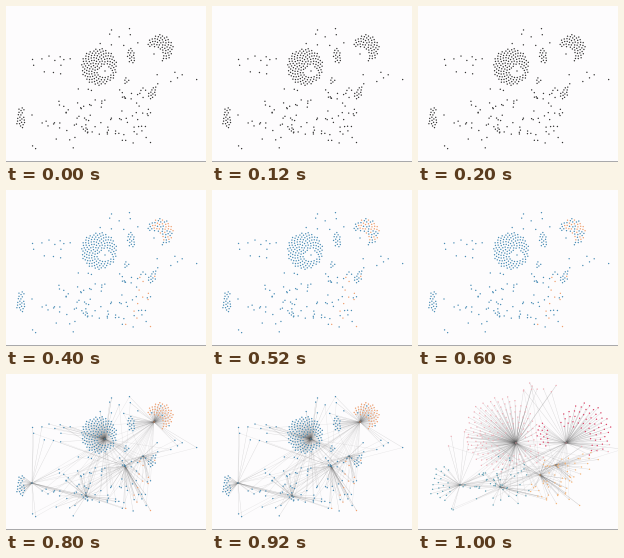
A matplotlib script for the animation above (1200 ms loop, 200 by 156 pixels).

```python
import numpy as np
import matplotlib.pyplot as plt
from matplotlib.animation import FuncAnimation
from matplotlib.collections import LineCollection
from matplotlib.colors import to_rgba

W, H, DPI = 200, 156, 100
BLACK, BLUE, ORANGE = "#333333", "#4a8db5", "#f0a070"
PINK, CRIMSON, TEAL, AMBER = "#efb0b8", "#dc4468", "#5f9fb4", "#f6b67a"
GOLDEN_ANGLE = np.pi * (3 - np.sqrt(5))
rng = np.random.default_rng(7)


def packed(center, rx, ry, tilt=0, hole=None, step=1.48):
    """Evenly packed dots in a tilted ellipse, minus an optional disc (x, y, r)."""
    k = np.arange(300) + 0.5
    r, a, t = step * np.sqrt(k), k * GOLDEN_ANGLE, np.radians(tilt)
    u, v = r * np.cos(a - t) / rx, r * np.sin(a - t) / ry
    p = np.column_stack([r * np.cos(a), r * np.sin(a)])[u**2 + v**2 <= 1] + center
    if hole:
        p = p[np.hypot(*(p - hole[:2]).T) > hole[2]]
    return p


def sprinkled(n, x0, x1, y0, y1):
    return rng.uniform((x0, y0), (x1, y1), (n, 2))


def spread(p, center, scale):
    return center + (p - p.mean(axis=0)) * scale


def nearest(p, targets):
    return np.argmin(np.hypot(*(p[:, None] - targets).transpose(2, 0, 1)), axis=1)


hubs = np.array([(99, 65), (148, 48), (26, 109), (137, 82), (119, 92), (80, 122)])
hubs_open = np.array([(98, 69), (148, 69), (42, 111), (137, 91), (122, 101), (82, 113)])

# Each cluster: dots, opened centre, opened scale, hub, final colour
clusters = [
    (packed((93, 61), 18, 18.8, hole=(99, 65.5, 6)), (82, 59), 2.05, 0, PINK),
    (packed((154, 42), 13.2, 13.6, hole=(146, 51, 10.5)), (171, 51), 2, 1, CRIMSON),
    (packed((125.3, 50), 4, 8.5, -12), (125, 61), 1.6, 1, CRIMSON),
    (packed((15.5, 112), 5.5, 10.5, hole=(26, 109, 8)), (23, 110), (2.5, 1.7), 2, TEAL),
    (packed((146.5, 87), 4, 6.8, 25), (162, 91), (3.3, 2.1), 3, AMBER),
    (packed((120.5, 75), 2.2, 5, 20), (121, 84), 1.8, 0, PINK),
    (packed((79, 124), 5, 2.4, 35), (72, 107), 2, 2, TEAL),
]

# Loose dots: sparse at the top, left, right and foot, dense in the lower middle
loose = np.vstack([
    sprinkled(9, 94, 132, 17, 42), sprinkled(12, 26, 72, 50, 68),
    sprinkled(6, 52, 68, 86, 110), sprinkled(15, 20, 70, 112, 145),
    sprinkled(7, 150, 196, 62, 80), sprinkled(6, 100, 146, 126, 142),
    sprinkled(70, 70, 146, 82, 130)])
loose_open = spread(loose, (108, 98), (1.05, 0.8)) + rng.normal(0, 3, loose.shape)
high = loose[:, 1] < 45
loose_open[high] = sprinkled(high.sum(), 103, 146, 3, 22)

closed = np.vstack([c[0] for c in clusters] + [loose, hubs])
opened = np.vstack([spread(*c[:3]) for c in clusters] + [loose_open, hubs_open])
owner = [hub for dots, *_, hub, _ in clusters for _ in dots]
clustered, first_hub = len(owner), len(closed) - len(hubs)
owner = np.append(owner, nearest(loose, hubs))

final = [color for dots, *_, color in clusters for _ in dots]
final += [PINK if y < 80 else AMBER if x > 112 else TEAL for x, y in opened[clustered:]]

# Orange dominates the right crescent and is scattered in the lower right
x, y = closed.T
mix = rng.random(len(closed))
in_right, in_low = (x > 141) & (y < 57), (x > 118) & (y > 85)


def shaded(right_share, low_share):
    warm = (in_right & (mix < right_share)) | (in_low & (mix < low_share))
    return np.where(warm, ORANGE, BLUE)


spokes = [(i, first_hub + h) for i, h in enumerate(owner)]
strays = [(i, first_hub + rng.choice([0, 0, 1, 3, 4]))
          for i in range(clustered, first_hub) if mix[i] < 0.7]
strays += [(first_hub + a, first_hub + b) for a in range(6) for b in range(a)]
edges = np.array(spokes + strays)


def edge_colors(spoke_alpha, stray_alpha):
    return ([to_rgba("#555555", spoke_alpha)] * len(spokes)
            + [to_rgba("#555555", stray_alpha)] * len(strays))


# Look of the graph in each stage: places, dot colours, edge colours
stages = [
    (closed, [BLACK] * len(closed), None),
    (closed, shaded(0.5, 0.22), None),
    (closed, shaded(0.9, 0.25), edge_colors(0.2, 0.13)),
    (opened, final, edge_colors(0.21, 0.13)),
]

fig = plt.figure(figsize=(W / DPI, H / DPI), dpi=DPI, facecolor="#fdfcfd")
ax = fig.add_axes([0, 0, 1, 1])
ax.set(xlim=(0, W), ylim=(H, 0))
ax.axis("off")
ax.plot([0, W], [155.3, 155.3], color="#a9a9ab", lw=0.72)
links = LineCollection([], linewidths=0.3, zorder=1)
ax.add_collection(links)
dots = ax.scatter(*closed.T, s=1, linewidths=0, zorder=2)


def draw(i):
    places, colors, link_colors = stages[max(i // 2, i - 2)]
    dots.set_offsets(places)
    dots.set_facecolors(colors)
    links.set_segments(places[edges] if link_colors else [])
    if link_colors:
        links.set_color(link_colors)
    return links, dots


anim = FuncAnimation(fig, draw, frames=6, interval=200, repeat=True)
plt.show()
```
